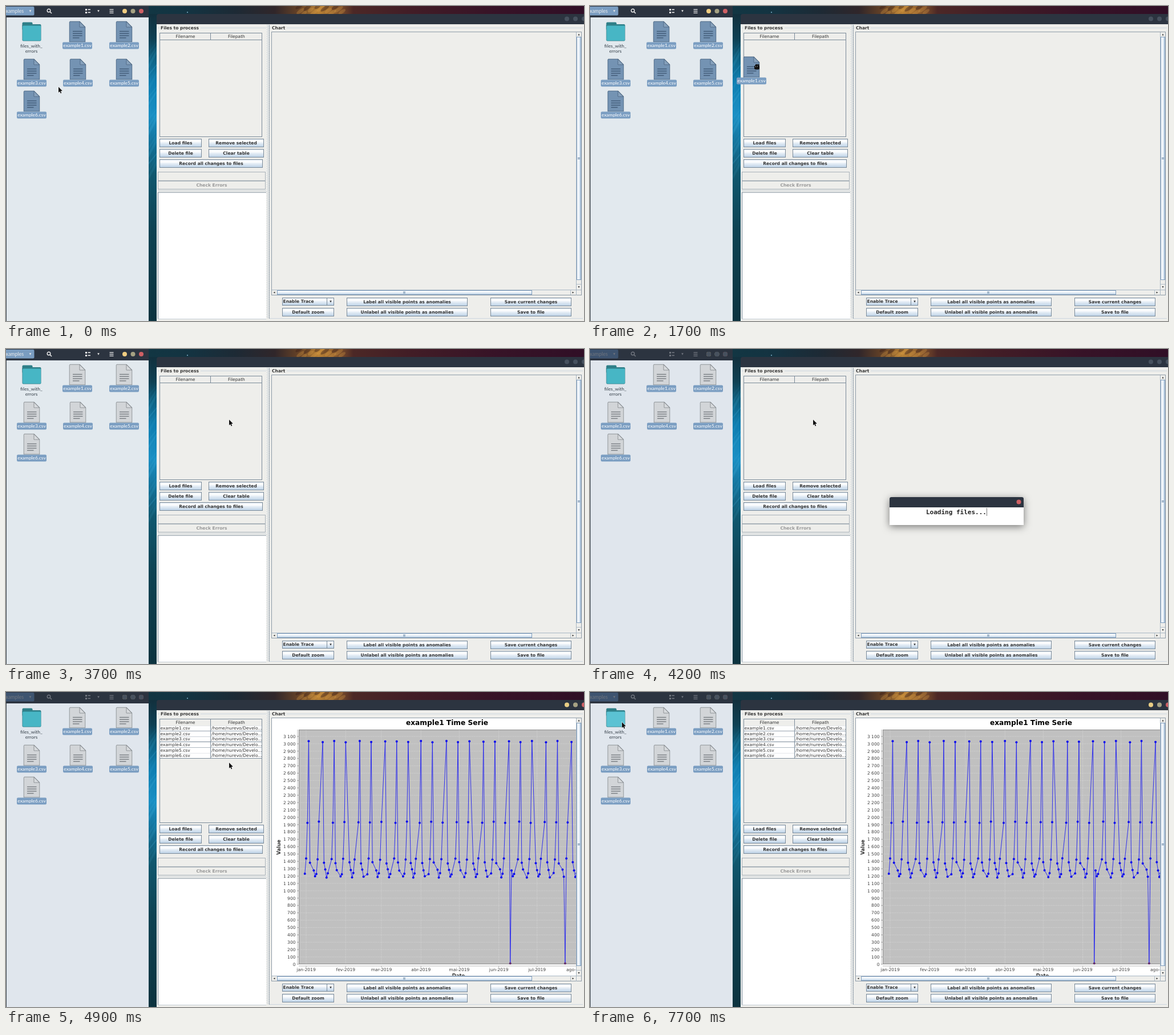
Write an HTML page with a canvas that moves like this. It is 1013 px wide and 553 px high and loops after 8 s.

```html
<!DOCTYPE html>
<html lang="en">
<head>
<meta charset="utf-8">
<title>Loading files by drag and drop</title>
<style>
  html, body { margin: 0; height: 100%; overflow: hidden; background: #eeeeeb; }
  canvas { display: block; }
</style>
</head>
<body>
<canvas id="stage" width="1013" height="553"></canvas>
<script>
const c = document.getElementById('stage').getContext('2d');
const LOOP = 8000, STEP = 100;
const PANEL = '#eeeeeb', EDGE = '#7a8a99', DARK = '#2c3440', INK = '#333';
const UI = '"DejaVu Sans", sans-serif', FILES = 'Lato, sans-serif';

const clamp = v => Math.max(0, Math.min(1, v));
const smooth = v => { v = clamp(v); return v * v * (3 - 2 * v); };
const mix = (a, b, p) => a + (b - a) * p;
const bezier = (a, b, d, p) => (1 - p) ** 2 * a + 2 * p * (1 - p) * b + p * p * d;

function rect(x, y, w, h, fill, stroke) {
  if (fill) { c.fillStyle = fill; c.fillRect(x, y, w, h); }
  if (stroke) { c.strokeStyle = stroke; c.lineWidth = 1; c.strokeRect(x + .5, y + .5, w - 1, h - 1); }
}
function round(x, y, w, h, r, fill) {
  c.fillStyle = fill;
  c.beginPath(); c.roundRect(x, y, w, h, r); c.fill();
}
function poly(points, fill, stroke, width = 1) {
  c.beginPath();
  points.forEach(([x, y]) => c.lineTo(x, y));
  c.closePath();
  if (stroke) { c.strokeStyle = stroke; c.lineWidth = width; c.stroke(); }
  if (fill) { c.fillStyle = fill; c.fill(); }
}
function dot(x, y, r, fill) {
  c.fillStyle = fill;
  c.beginPath(); c.arc(x, y, r, 0, 7); c.fill();
}
function line(x1, y1, x2, y2, color, width = 1) {
  c.strokeStyle = color; c.lineWidth = width;
  c.beginPath(); c.moveTo(x1, y1); c.lineTo(x2, y2); c.stroke();
}
function text(s, x, y, { size = 7.55, bold = true, align = 'center', color = INK, family = UI } = {}) {
  c.font = `${bold ? 'bold ' : ''}${size}px ${family}`;
  c.textAlign = align;
  c.fillStyle = color;
  c.fillText(s, x, y + size * .36);
}
function gradient(x1, y1, x2, y2, stops) {
  const g = c.createLinearGradient(x1, y1, x2, y2);
  stops.forEach(([at, color]) => g.addColorStop(at, color));
  return g;
}
function clipped(x, y, w, h, draw) {
  c.save();
  c.beginPath(); c.rect(x, y, w, h); c.clip();
  draw();
  c.restore();
}
function metal(x, y, w, h, { sideways = false, edge = EDGE } = {}) {
  const stops = [[0, '#dfe9f3'], [.3, '#fff'], [.5, '#e6eef6'], [1, '#b8cfe5']];
  rect(x, y, w, h, sideways ? gradient(x, 0, x + w, 0, stops) : gradient(0, y, 0, y + h, stops), edge);
}
function button(label, x, y, w) {
  metal(x, y, w, 15);
  text(label, x + w / 2, y + 7.5);
}
const triangle = (x, y, dx, dy, color) =>
  poly([[x + dx, y + dy], [x - dx - dy, y - dy - dx], [x - dx + dy, y - dy + dx]], color);

function wallpaper() {
  rect(250, 0, 763, 15, gradient(250, 0, 1013, 0, [
    [0, '#123643'], [.1, '#143341'], [.2, '#1d2a35'], [.29, '#30262a'], [.35, '#6b4526'],
    [.39, '#b98235'], [.43, '#8a5a2c'], [.47, '#4c2826'], [.6, '#421d26'], [.8, '#371327'], [1, '#300f26']]));
  clipped(250, 0, 763, 14, () => {
    for (let i = 0; i < 14; i++) {
      c.fillStyle = i % 3 ? 'rgba(235,170,75,.25)' : 'rgba(50,25,25,.4)';
      c.beginPath();
      c.ellipse(515 + i * 37 % 80, i * 5 % 14, 9 - i % 4, 3, -.6, 0, 7);
      c.fill();
    }
    dot(318, 11, 1, '#7fb4cf');
  });
  rect(250, 14, 15, 539, gradient(0, 14, 0, 553, [
    [0, '#12303d'], [.08, '#0f4053'], [.15, '#0e6486'], [.22, '#0e7db0'], [.33, '#1a8fc4'],
    [.42, '#14739b'], [.52, '#10586f'], [.7, '#0e4353'], [1, '#0c333f']]));
  clipped(250, 14, 14, 539, () => {
    for (let i = 0; i < 18; i++) {
      const y = 70 + i * 13;
      line(248, y + 14, 266, y - 8 - i % 3 * 6, `rgba(70,180,220,${.06 + i % 4 * .05})`, 2 + i % 3);
    }
  });
}

function fileIcon(x, y, fill, ink) {
  poly([[x + 1.5, y + .5], [x + 18, y + .5], [x + 27.5, y + 10], [x + 27.5, y + 35.5], [x + .5, y + 35.5], [x + .5, y + 1.5]], fill, ink, 1.4);
  poly([[x + 18, y + .5], [x + 27.5, y + 10], [x + 18, y + 10]], 'rgba(255,255,255,.13)', ink, .8);
  for (let i = 0; i < 4; i++) line(x + 6, y + 17.5 + i * 3.8, x + (i < 3 ? 22.5 : 17.5), y + 17.5 + i * 3.8, ink, 1.4);
}
function file(n, cx, top, fill, ink) {
  fileIcon(cx - 14, top, fill, ink);
  round(cx - 26, top + 36.5, 52, 12, 2, '#7b9ec2');
  text(`example${n}.csv`, cx, top + 42, { size: 8.4, bold: false, color: '#fff', family: FILES });
}

function fileManager(t) {
  const blur = smooth((t - 3700) / 400), focused = t < 3700;
  rect(0, 0, 250, 553, blur ? '#e0e6ed' : '#e2e9ee');
  rect(0, 0, 250, 20, DARK);
  rect(0, 20, 1, 533, '#3b444d');
  round(-4, 1, 53.5, 15.5, 2, `rgb(${mix(122, 62, blur)},${mix(157, 84, blur)},${mix(193, 112, blur)})`);
  const v = mix(235, 112, blur), ink = `rgb(${v},${v + 5 * blur},${v + 14 * blur})`;
  text('xamples', -.5, 9, { size: 8.8, bold: false, align: 'left', color: ink, family: FILES });
  triangle(42.5, 9, 0, 1.8, ink);
  c.strokeStyle = ink; c.lineWidth = 1.4;
  c.beginPath(); c.arc(75, 8, 2.8, 0, 7); c.stroke();
  line(77, 10, 80, 13, ink, 1.6);
  for (const y of [5.5, 10.5]) {
    rect(139, y - .5, 3, 3, ink);
    rect(143.5, y, 4.5, 1.6, ink);
  }
  triangle(162, 9, 0, 1.8, ink);
  for (const y of [5.5, 8.5, 11.5]) rect(181.5, y, 7, 1.3, ink);
  ['#f0cd81', '#a6a283', '#cf6064'].forEach((color, i) => {
    dot(208 + i * 14.5, 9, 4, color);
    c.globalAlpha = blur; dot(208 + i * 14.5, 9, 4.2, '#47515e'); c.globalAlpha = 1;
  });

  const hover = t >= 7600;
  round(28.5, 28.5, 18, 14, 2, '#2e7f88');
  round(28.5, 32, 33, 29.5, 2, '#2e7f88');
  round(29.2, 34.5, 31.8, 26.3, 1.5, hover ? '#5bc2d3' : '#47b6c5');
  const label = { size: 8.4, bold: false, color: '#36404a', family: FILES };
  text('files_with_', 44.5, 69.5, label);
  text('errors', 44.5, 79, label);

  [[125, 27], [207, 27], [45, 93], [126, 93], [207, 93], [45, 149]].forEach(([x, y], i) => {
    const lit = i === 0 && t >= 600 && t < 1500;
    file(i + 1, x, y, focused ? (lit ? '#8daac8' : '#7493b3') : '#d2d5d8', focused ? '#405a76' : '#777c81');
  });
}

function dotted(x, y, w, h) {
  c.fillStyle = '#b6c2cd';
  for (let j = 0; j < h; j += 2) for (let i = j % 4 / 2; i < w; i += 2) c.fillRect(x + i, y + j, 1, 1);
}

function filePanel(t) {
  rect(266, 38, 190, 1, '#ccd6de');
  rect(269, 34, 72, 8, PANEL);
  text('Files to process', 271, 38.5, { align: 'left' });
  rect(269, 47, 180, 183, PANEL, EDGE);
  rect(269, 47, 180, 13, null, EDGE);
  rect(358, 47, 1, 12, EDGE);
  text('Filename', 314.5, 53.5, { bold: false });
  text('Filepath', 404, 53.5, { bold: false });
  if (t >= 4800) for (let i = 0; i < 6; i++) {
    const y = 59.2 + i * 9.6;
    rect(270, y, 178, 9.6, '#fff');
    rect(270, Math.round(y + 9), 178, 1, EDGE);
    rect(358, y, 1, 9.6, EDGE);
    text(`example${i + 1}.csv`, 270.5, y + 4.2, { bold: false, align: 'left' });
    text('/home/nurevo/Develo...', 360, y + 4.2, { bold: false, align: 'left' });
  }
  button('Load files', 269, 233, 74);
  button('Remove selected', 355, 233, 97);
  button('Delete file', 269, 251, 74);
  button('Clear table', 355, 251, 97);
  button('Record all changes to files', 269, 269, 181);
  rect(266, 291, 189, 16, PANEL, '#a9b2ba');
  rect(266, 307, 189, 15, PANEL, '#a9b2ba');
  text('Check Errors', 360.5, 314.5, { color: '#999' });
  dotted(266, 323, 190, 4);
  rect(266, 327, 190, 223, '#fff');
  rect(266, 327, 190, 1, '#96a2ad');
  rect(266, 327, 1, 223, EDGE);
  rect(266, 549, 190, 1, '#c5ced6');
}

const CYCLE = [1232, 1432, 1932, 3030, 1380, 1284, 1188];
const chartY = v => 478 - v * .12903;
const dayX = d => 526 + d * 2.236;
const series = Array.from({ length: 156 }, (_, i) => {
  let day = Math.floor(i / 5) * 7 + i % 5 - 1;
  if (day > 80) day--;
  const outlier = i === 116 || i === 147;
  return { x: dayX(day), y: chartY(outlier ? 8 : CYCLE[i % 7] + 9 * Math.sin(i * 2.3)), outlier };
});

function chart() {
  rect(466, 46, 533, 452, '#fff');
  text('example1 Time Serie', 773, 53.5, { size: 12.2, color: '#000' });
  rect(513, 66, 490, 412, '#c0c0c0', '#8d8d8d');
  const small = { bold: false, color: '#404040' };
  const grid = 'rgba(255,255,255,.42)';
  for (let v = 0; v <= 3100; v += 100) {
    const y = chartY(v);
    c.setLineDash([1.5, 1.5]);
    if (v) line(514, y, 1000, y, grid, .7);
    c.setLineDash([]);
    line(510, y, 513, y, '#888', .7);
    text(v < 1000 ? `${v}` : `${Math.floor(v / 1000)} ${String(v % 1000).padStart(3, '0')}`, 507.5, y, { ...small, align: 'right' });
  }
  line(511, 66, 511, 478, '#999', .7);
  line(513, 481, 1000, 481, '#999', .7);
  const months = { jan: 0, fev: 31, mar: 59, abr: 90, mai: 120, jun: 151, jul: 181, ago: 212 };
  for (const [name, day] of Object.entries(months)) {
    const x = dayX(day);
    c.setLineDash([1.5, 1.5]);
    line(x, 67, x, 478, grid, .7);
    c.setLineDash([]);
    line(x, 481, x, 483, '#888', .7);
    text(`${name}-2019`, x, 487.5, small);
  }
  text('Date', 793, 498, { size: 8.5 });
  c.save();
  c.translate(478, 272.5); c.rotate(-Math.PI / 2);
  text('Value', 0, 0, { size: 8.5 });
  c.restore();
  c.strokeStyle = '#2020f0'; c.lineWidth = .9; c.lineJoin = 'round';
  c.beginPath();
  series.forEach(p => c.lineTo(p.x, p.y));
  c.stroke();
  series.forEach(p => dot(p.x, p.y - (p.outlier ? .5 : 0), 2, p.outlier ? '#65316f' : '#0808ee'));
}

function chartPanel(t) {
  dotted(457, 33, 4, 516);
  rect(461, 33, 1, 516, '#9aa5af');
  rect(462, 38, 549, 1, '#ccd6de');
  rect(464, 34, 28, 8, PANEL);
  text('Chart', 466, 38.5, { align: 'left' });
  rect(465, 45, 544, 463, PANEL, '#8f9ca8');
  if (t >= 4900) clipped(466, 46, 533, 452, chart);

  const thumb = '#7f9dbd';
  rect(999, 46, 1, 462, '#a9b7c4');
  rect(466, 498, 542, 1, '#a9b7c4');
  metal(1000, 54, 8, 427, { sideways: true, edge: thumb });
  metal(475, 499, 447, 8, { edge: thumb });
  rect(1000, 488, 8, 1, '#b4c0ca');
  rect(989, 499, 1, 8, '#b4c0ca');
  triangle(1004, 50, 0, -1.5, INK);
  triangle(1004, 493.5, 0, 1.5, INK);
  triangle(470, 503, -1.5, 0, INK);
  triangle(994, 503, 1.5, 0, INK);
  for (const d of [-1.5, .5]) {
    rect(1002, 267.5 + d, 4, 1, '#6382a0');
    rect(698 + d, 501, 1, 4, '#6382a0');
  }

  metal(484, 512, 91, 14);
  rect(562, 512, 1, 14, EDGE);
  triangle(569, 519, 0, 1.8, INK);
  text('Enable Trace', 485.5, 518.5, { align: 'left' });
  button('Default zoom', 484, 530, 91);
  button('Label all visible points as anomalies', 597, 512, 212);
  button('Unlabel all visible points as anomalies', 597, 530, 212);
  button('Save current changes', 849, 512, 142);
  button('Save to file', 849, 530, 142);
  rect(462, 548, 549, 1, '#ccd6de');
}

function mainWindow(t) {
  round(264, 14, 760, 30, [4, 0, 0, 0], DARK);
  rect(264, 32, 749, 521, PANEL);
  rect(264, 32, 1, 521, '#fafafa');
  const focus = clamp((t - 4600) / 200);
  ['#e9cd83', '#a6a283', '#cf6064'].forEach((color, i) => {
    dot(983 + i * 15, 22.5, 4, '#47515e');
    c.globalAlpha = focus; dot(983 + i * 15, 22.5, 4, color); c.globalAlpha = 1;
  });
  filePanel(t);
  chartPanel(t);
}

function dialog(t) {
  if (t <= 3700 || t > 4800) return;
  const closing = clamp((t - 4600) / 200);
  const shown = smooth((t - 3700) / 400);
  const scale = closing ? 1 - .18 * closing : mix(.85, 1, shown);
  c.save();
  c.globalAlpha = closing ? Math.max(.006, (1 - closing) * .8) : shown;
  c.translate(642.5, 284); c.scale(scale, scale); c.translate(-642.5, -284);
  c.shadowColor = `rgba(0,0,0,${.5 * (1 - closing)})`; c.shadowBlur = 14; c.shadowOffsetY = 3;
  round(525, 260, 235, 49, [3, 3, 0, 0], '#fff');
  c.shadowColor = 'transparent';
  round(525, 260, 235, 18, [3, 3, 0, 0], DARK);
  dot(751.5, 268.5, 4, '#cf6064');
  text('Loading files...', 589, 286, { size: 11, align: 'left', color: '#222', family: '"DejaVu Sans Mono", monospace' });
  rect(695, 279, 1, 14, '#777');
  c.restore();
}

function arrow(x, y) {
  poly([[0, 0], [0, 10], [2.2, 8], [3.8, 11.4], [5.3, 10.7], [3.8, 7.4], [6.8, 7]].map(([a, b]) => [x + a, y + b]),
    '#111', 'rgba(255,255,255,.7)', 1.2);
}
function hand(x, y) {
  round(x, y + 2, 9, 7.5, 2.5, '#111');
  for (let i = 0; i < 3; i++) round(x + 2 + i * 2.2, y, 2, 4, 1, '#111');
  rect(x + 2, y + 4, 1, 1, '#eee');
  rect(x + 5, y + 3.5, 1, 1, '#eee');
}

// Offset of the dragged icon from its resting place, one entry per step.
const DRAG = [[-32, 60], [50, 150], [158, 62], [214, 66], [246, 73], [263, 80], [270, 84]];

function pointer(t) {
  if (t >= 1500 && t < 3300) {
    const [dx, dy] = DRAG[Math.min(DRAG.length - 1, (t - 1500) / STEP)];
    file(1, 125 + dx, 27 + dy, '#7493b3', '#405a76');
    hand(130 + dx, 40 + dy);
  } else if (t < 1500) {
    const p = smooth(t / 600);
    arrow(mix(92, 121, p), mix(142, 40, p));
  } else {
    const p = smooth((t - 6800) / 900);
    arrow(bezier(391, 250, 56, p), bezier(124, 296, 53, p));
  }
}

function frame(now) {
  const t = Math.floor(now % LOOP / STEP) * STEP;
  wallpaper();
  fileManager(t);
  mainWindow(t);
  dialog(t);
  pointer(t);
  requestAnimationFrame(frame);
}
requestAnimationFrame(frame);
</script>
</body>
</html>
```
